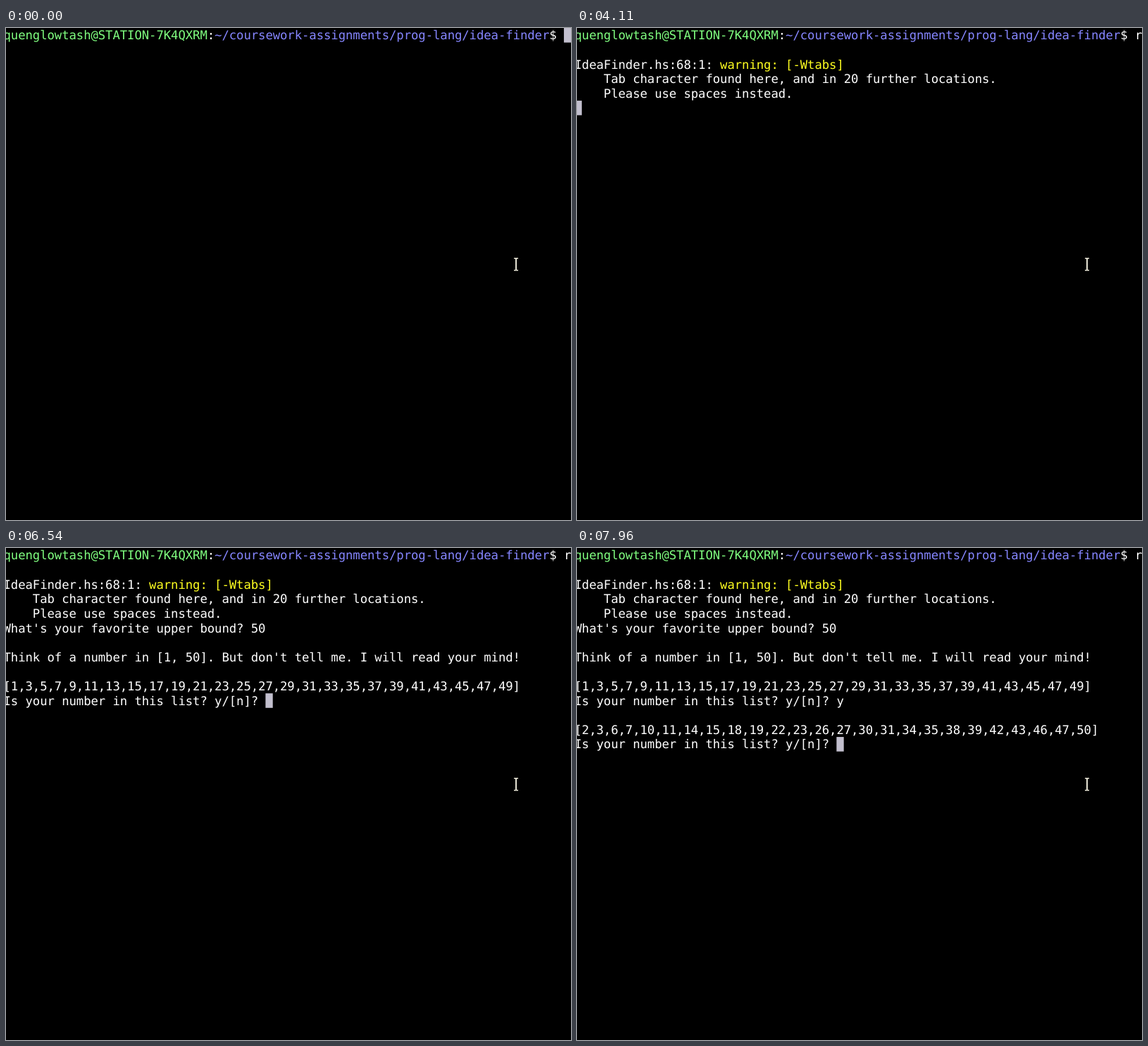
These frames come from a looping animation (802 px wide and 698 px high, 8 s). An HTML page with a canvas:

```html
<!DOCTYPE html>
<html lang="en">
<head>
<meta charset="utf-8">
<title>Terminal session</title>
<style>
  html, body { margin: 0; width: 100%; height: 100%; overflow: hidden; background: #000; }
  canvas { display: block; }
</style>
</head>
<body>
<canvas id="stage" width="802" height="698"></canvas>
<script>
const ctx = document.getElementById('stage').getContext('2d');
const LOOP = 8000;
const CELL = { x: -3.5, w: 10.33, h: 20.62, base: 16.4 };
const WHITE = '#ffffff', GREEN = '#80ff80', BLUE = '#8686ff', YELLOW = '#ffff20';
const CURSOR = '#c2bfce', POINTER = '#e6e3d4';

const bitList = bit =>
  '[' + Array.from({ length: 50 }, (_, i) => i + 1).filter(n => n & bit).join() + ']';
const ASK = 'Is your number in this list? y/[n]? ';

// Each entry: time, row, column, text, colour
const output = [
  [0, 0, 0, 'quenglowtash@STATION-7K4QXRM', GREEN],
  [0, 0, 28, ':', WHITE],
  [0, 0, 29, '~/coursework-assignments/prog-lang/idea-finder', BLUE],
  [0, 0, 75, '$', WHITE],
  [200, 0, 77, 'r', WHITE],
  [4110, 2, 0, 'IdeaFinder.hs:68:1:', WHITE],
  [4110, 2, 20, 'warning: [-Wtabs]', YELLOW],
  [4110, 3, 4, 'Tab character found here, and in 20 further locations.', WHITE],
  [4110, 4, 4, 'Please use spaces instead.', WHITE],
  [4180, 5, 0, "What's your favorite upper bound?", WHITE],
  [5530, 5, 34, '5', WHITE],
  [5660, 5, 35, '0', WHITE],
  [5870, 7, 0, "Think of a number in [1, 50]. But don't tell me. I will read your mind!", WHITE],
  [5870, 9, 0, bitList(1), WHITE],
  [5870, 10, 0, ASK, WHITE],
  [7210, 10, 36, 'y', WHITE],
  [7410, 12, 0, bitList(2), WHITE],
  [7410, 13, 0, ASK, WHITE]
];

// Each entry: time, row, column
const cursorStops = [
  [0, 0, 77], [200, 0, 78], [2970, 1, 0], [4110, 5, 0], [4180, 5, 34],
  [5530, 5, 35], [5660, 5, 36], [5870, 10, 36], [7210, 10, 37], [7410, 13, 36]
];

const colX = col => CELL.x + col * CELL.w;

function drawText(row, col, text, colour) {
  ctx.fillStyle = colour;
  const y = row * CELL.h + CELL.base;
  [...text].forEach((ch, i) => ctx.fillText(ch, colX(col + i), y));
}

function drawCursor(row, col) {
  ctx.fillStyle = CURSOR;
  ctx.fillRect(colX(col), row * CELL.h, CELL.w, CELL.h);
}

function drawPointer() {
  ctx.fillStyle = POINTER;
  ctx.fillRect(721, 326, 6, 1.5);
  ctx.fillRect(723, 327, 2, 17);
  ctx.fillRect(721, 343, 6, 1.5);
}

function render(t) {
  ctx.fillStyle = '#000';
  ctx.fillRect(0, 0, 802, 698);
  ctx.font = '17.3px "DejaVu Sans Mono", monospace';
  ctx.textRendering = 'geometricPrecision';
  for (const [time, ...run] of output) if (t >= time) drawText(...run);
  const [, row, col] = cursorStops.filter(stop => t >= stop[0]).pop();
  drawCursor(row, col);
  drawPointer();
}

const start = performance.now();
function tick() {
  render((performance.now() - start) % LOOP);
  requestAnimationFrame(tick);
}
tick();
</script>
</body>
</html>
```
